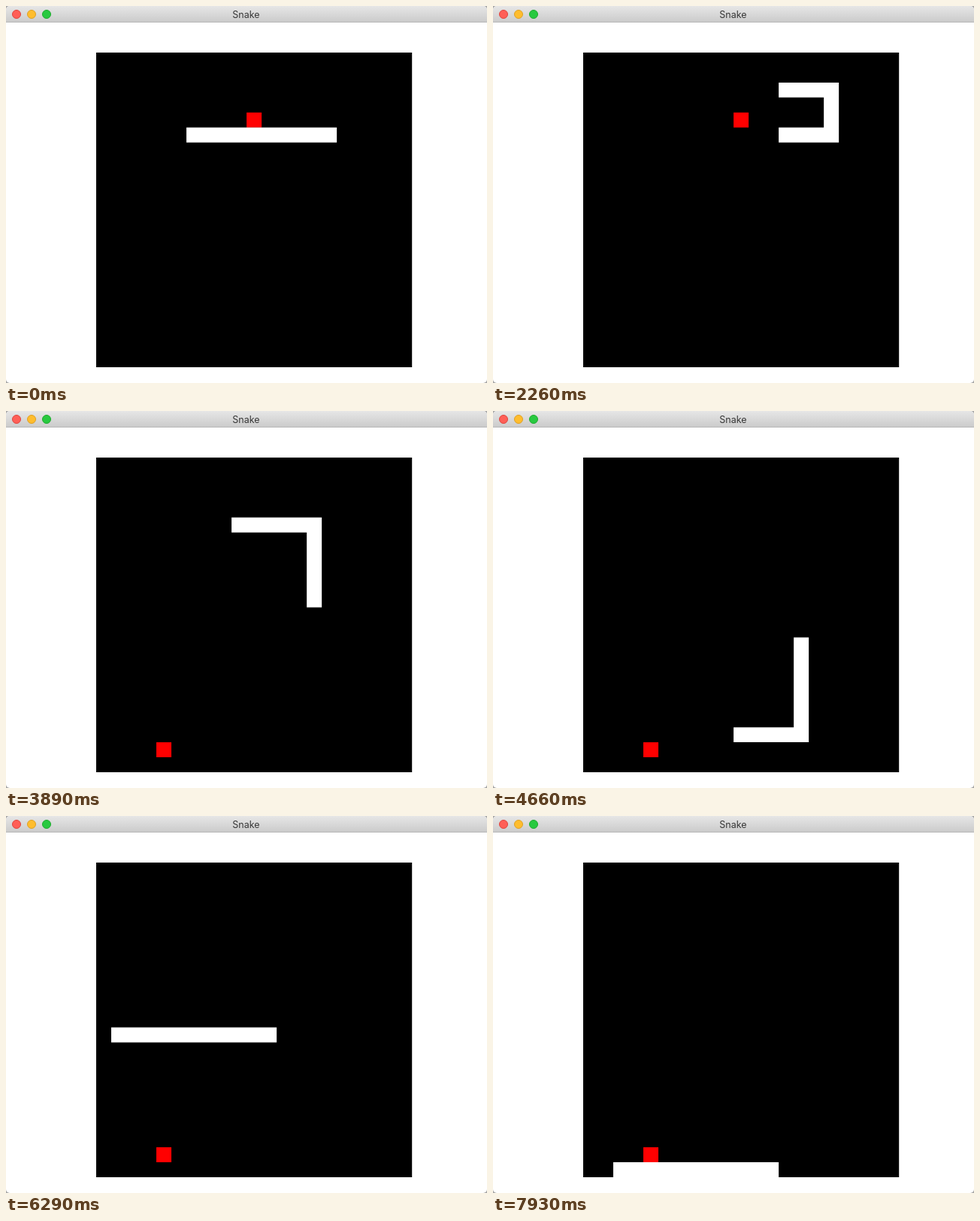
An HTML page that plays this animation: 640x502 px, repeating every 7.99 s.

```html
<!DOCTYPE html>
<html lang="en">
<head>
<meta charset="utf-8">
<title>Snake</title>
<style>
  html, body { margin: 0; width: 100%; height: 100%; overflow: hidden; background: #a4a4a4; }
  svg { display: block; width: 100%; height: 100%; }
  text { font: 12.5px Inter, Roboto, sans-serif; fill: #363636; text-anchor: middle; }
</style>
</head>
<body>
<svg viewBox="0 0 640 502">
  <defs>
    <linearGradient id="bar" x2="0" y2="1">
      <stop stop-color="#e6e6e6"/>
      <stop offset="1" stop-color="#cacaca"/>
    </linearGradient>
    <clipPath id="window"><rect width="640" height="502" rx="5"/></clipPath>
  </defs>
  <g clip-path="url(#window)">
    <rect width="640" height="502" fill="#fff"/>
    <rect width="640" height="22" fill="url(#bar)"/>
    <rect y="21" width="640" height="1" fill="#b8b8b8"/>
  </g>
  <g>
    <circle cx="14" cy="11" r="5.5" fill="#ff5f57" stroke="#e0453e"/>
    <circle cx="34" cy="11" r="5.5" fill="#ffbd2e" stroke="#dfa023"/>
    <circle cx="54" cy="11" r="5.5" fill="#28c940" stroke="#1dab2c"/>
  </g>
  <text x="319.5" y="16">Snake</text>
  <g transform="translate(120 62) scale(20.01 19.952)">
    <rect width="21" height="21"/>
    <rect id="food" width="1" height="1" fill="#f00"/>
    <polyline id="snake" transform="translate(.5 .5)" fill="none" stroke="#fff"
      stroke-width="1" stroke-linecap="square" stroke-linejoin="miter"/>
  </g>
</svg>
<script>
  const LOOP = 7990;
  const FIRST_MOVE = 40;
  const MOVE_TIME = 58.3;
  const START_LENGTH = 10;
  const EAT_MOVE = 58;

  // Signed run lengths, alternately across and down.
  const runs = [11, -2, -14, 2, 13, -3, -13, 2, 11, 14, -14, -7, 16, 9, -14];

  const cells = [[6, 5]];
  runs.forEach((run, i) => {
    for (let n = Math.abs(run); n > 0; n--) {
      const next = [...cells.at(-1)];
      next[i % 2] += Math.sign(run);
      cells.push(next);
    }
  });
  const lastMove = cells.length - START_LENGTH;

  const snake = document.getElementById('snake');
  const food = document.getElementById('food');

  function draw(move) {
    const eaten = move >= EAT_MOVE;
    const end = START_LENGTH + move;
    const length = START_LENGTH + (eaten ? 1 : 0);
    snake.setAttribute('points', cells.slice(end - length, end).join(' '));
    food.setAttribute('x', eaten ? 4 : 10);
    food.setAttribute('y', eaten ? 19 : 4);
  }

  let start;
  function tick(now) {
    start ??= now;
    const t = (now - start) % LOOP;
    const move = Math.floor((t - FIRST_MOVE) / MOVE_TIME) + 1;
    draw(Math.min(move, lastMove));
    requestAnimationFrame(tick);
  }
  draw(0);
  requestAnimationFrame(tick);
</script>
</body>
</html>
```
